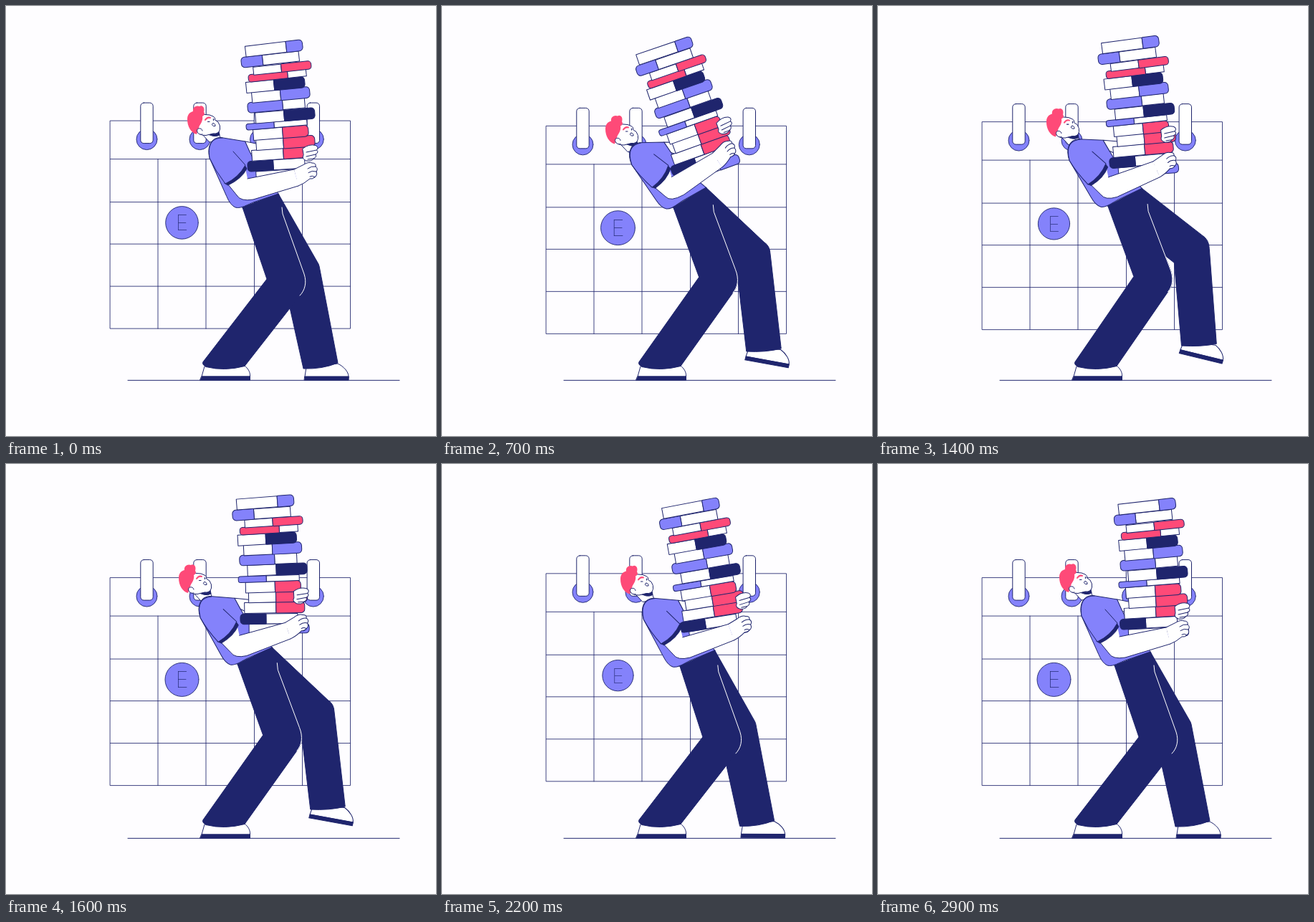
An HTML page with a canvas for the animation above (3 s loop, 600 px wide and 600 px high).

```html
<!DOCTYPE html>
<html lang="en">
<head>
<meta charset="utf-8">
<title>Carrying books</title>
<style>
  html, body { margin: 0; width: 100%; height: 100%; overflow: hidden; background: #fefdff; }
  canvas { display: block; width: 600px; height: 600px; }
</style>
</head>
<body>
<canvas id="stage" width="600" height="600"></canvas>
<script>
const ctx = document.getElementById('stage').getContext('2d');
const LOOP = 3000, STEP = 100;
const PAPER = '#fefdff', WHITE = '#fff', NAVY = '#1f256d', VIOLET = '#8482fb', PINK = '#fe4a78';

// Pose keys; values are offsets from the starting pose.
const TIMES = [0, 400, 700, 1100, 1600, 2200, 2900];
const POSE = {
  torsoX: [0, -3, -7, -11, -7, 2, 0],
  torsoY: [0, 2, 2, 0, -1, 2, 0],
  torsoA: [0, -7, -10.6, -9.5, -5, -4, 0],
  headX: [0, -14, -25, -25.5, -12, -4, 0],
  headY: [0, 7.5, 13.5, 10, 1, 2.5, 0],
  stackX: [0, -10, -17, -19, -10, -5, 0.6],
  stackY: [0, 6, 7, 1, -5, 6, 0],
  lean: [0, -12.3, -15.8, -8.5, -0.8, -7.5, 0.3],
  tilt: [0, -9.5, -13.5, -9.5, 2.5, -4.5, 0.3],
  handX: [0, -14, -23, -23, -12, -2, 0],
  handY: [0, -20, -29, -25, -8, -6, 0],
  gripX: [0, -21, -30, -28, -13, -4, 0],
  gripY: [0, -27, -38, -34, -21, -14, 0]
};

// cx, cy, length, height, cap length (negative: cap on the left), cap colour
const BOOKS = [
  [374, 59, 80, 15, 23, VIOLET],
  [368.5, 74.5, 81, 14, -30, VIOLET],
  [385.5, 86.5, 81, 11, 42, PINK],
  [378.5, 97, 81, 10, -55, PINK],
  [376, 110, 82, 15, 43, NAVY],
  [383.5, 124, 81, 15, 41, VIOLET],
  [377, 138.5, 80, 14, -49, VIOLET],
  [389.5, 153, 83, 15, 43, NAVY],
  [377.5, 165.5, 85, 8, -39, VIOLET],
  [383.5, 177, 77, 15, 36, PINK],
  [390, 191, 82, 15, 44, PINK],
  [385, 206, 84, 15, 40, PINK],
  [377, 221.5, 80, 14, -36, NAVY],
  [391, 235, 84, 13, 30, VIOLET]
];

const rad = deg => deg * Math.PI / 180;

// Smooth cyclic interpolation without overshoot.
function sample(vals, t) {
  const n = TIMES.length;
  const at = k => vals[(k + n) % n];
  const when = k => TIMES[(k + n) % n] + Math.floor(k / n) * LOOP;
  const slope = k => (at(k + 1) - at(k)) / (when(k + 1) - when(k));
  const tangent = k => {
    const a = slope(k - 1), b = slope(k);
    return a * b > 0 ? 2 * a * b / (a + b) : 0;
  };
  let i = n - 1;
  while (TIMES[i] > t) i--;
  const h = when(i + 1) - when(i), u = (t - when(i)) / h, v = 1 - u;
  return at(i) * (1 + 2 * u) * v * v + at(i + 1) * u * u * (3 - 2 * u)
    + h * u * v * (tangent(i) * v - tangent(i + 1) * u);
}

// Rigid move: turn about (px, py), then shift.
function rigid(px, py, dx, dy, deg) {
  const c = Math.cos(rad(deg)), s = Math.sin(rad(deg));
  const move = (x, y) => [
    px + dx + (x - px) * c - (y - py) * s,
    py + dy + (x - px) * s + (y - py) * c
  ];
  move.draw = fn => {
    ctx.save();
    ctx.translate(px + dx, py + dy);
    ctx.rotate(rad(deg));
    ctx.translate(-px, -py);
    fn();
    ctx.restore();
  };
  return move;
}

function shape(d, fill, stroke = NAVY, width = 1) {
  const path = new Path2D(d);
  if (fill) { ctx.fillStyle = fill; ctx.fill(path); }
  if (stroke) { ctx.strokeStyle = stroke; ctx.lineWidth = width; ctx.stroke(path); }
}

function disc(x, y, r, fill) {
  ctx.beginPath();
  ctx.arc(x, y, r, 0, 2 * Math.PI);
  ctx.fillStyle = fill;
  ctx.fill();
  ctx.strokeStyle = NAVY;
  ctx.lineWidth = 0.9;
  ctx.stroke();
}

function box(x, y, w, h, radii, fill) {
  ctx.beginPath();
  ctx.roundRect(x, y, w, h, radii);
  ctx.fillStyle = fill;
  ctx.fill();
  ctx.strokeStyle = NAVY;
  ctx.lineWidth = 1;
  ctx.stroke();
}

function calendar(t) {
  ctx.save();
  ctx.translate(0, 160.1 + 7.3 * Math.sin(2 * Math.PI * t / LOOP));
  let grid = 'M145.5 0H480.5V290H145.5Z';
  for (const y of [53.5, 113.5, 172, 231]) grid += `M145.5 ${y}H480.5`;
  for (const x of [212, 279, 346.5, 413.5]) grid += `M${x} 53.5V290`;
  shape(grid, null, NAVY, 0.85);
  for (const x of [196.5, 270.5, 355, 428.8]) {
    disc(x, 26, 14.5, VIOLET);
    box(x - 8.7, -25, 17.4, 56.5, 4.5, WHITE);
  }
  const r = 22.8 - 1.2 * Math.sin(2 * Math.PI * t / 1000);
  ctx.translate(245.5, 142.3);
  disc(0, 0, r, VIOLET);
  ctx.scale(r / 22.8, r / 22.8);
  ctx.fillStyle = NAVY;
  ctx.font = '100 30px Inter, Lato, sans-serif';
  ctx.textAlign = 'center';
  ctx.fillText('E', 0, 11);
  ctx.restore();
}

function legs(p, torso) {
  const q = p * p;
  const back = torso(330, 281), front = torso(380, 262);

  // Lifted foot and leg
  ctx.save();
  ctx.translate(417 + 26 * p - 23 * q, 517 - 42 * p);
  ctx.rotate(rad(15.5 * p));
  shape('M0 0L2-13L46-18C54-14 61-7 61 0Z', WHITE);
  shape('M0 0H61.3L61 5H-.5Z', NAVY);
  ctx.restore();
  const hemX = 463 + 30 * p - 22 * q, hemY = 498 - 30 * p;
  const inX = 415 + 30 * p - 23 * q, inY = 506 - 36 * p;
  const kneeX = 436 + 27 * p - 11 * q, kneeY = 360 - 46 * p;
  const calfX = 438 + 38 * p - 12 * q, calfY = 368 - 33 * p;
  shape(`M${back}L${front}L${kneeX} ${kneeY}
    Q${calfX - 1 + p} ${calfY - 6 - 8 * p} ${calfX} ${calfY}
    L${hemX} ${hemY}Q${(hemX + inX) / 2 + 2} ${(hemY + inY) / 2 + 5 - 2 * p} ${inX} ${inY}
    L${390 + 52 * p - 29 * q} ${394 - 10 * p - 34 * q}L385 336Z`, NAVY);

  // Standing foot and leg
  shape('M277 503L273 517H340.5C341 511 338 506 333 502Z', WHITE);
  shape('M273 517H340.5V522H271Z', NAVY);
  const edge = `L${386 - 10 * p} ${290 - 4 * p}L${416 - 10 * p} ${374 - 10 * p}
    C${420 - 8 * p} ${386 - 8 * p} ${417 - 6 * p} ${397 - 7 * p} ${410 - 6 * p} ${404 - 6 * p}`;
  const start = `M${385 - 10 * p} ${281 - 5 * p}`;
  shape(`${start}${edge}L333 502.5Q305 510 279 503.5Q273 500 275 496.5
    L${364 - 8 * p} ${381 - 4 * p}L${back}L${front}Z`, NAVY);
  shape(start + edge, null, WHITE, 1);
}

function head() {
  shape('M271 176L284 190L300 187L296 174Z', WHITE);
  shape('M282 179L297 175L298 180Q294 182.5 289 181.5Z', NAVY);
  shape(`M272 151L284 152L289 154Q293 156 291.5 159L296 162Q299.5 167 298.5 172
    Q297 179 289 178L279 180.5Q270 181 265 174Z`, WHITE);
  shape(`M266 179C258 177 253 168 253 158C253 151 257 148 261 147C260 141 266 138 270 140
    C274 137.5 278 142 276 148C278 150 276.5 153 274 154C275 158 273 163 270 167Z`, PINK, null);
  shape('M274 179C268 181 264 173 268.5 171Q273 170 274 174', WHITE);
  shape('M278 159Q281 154.5 285 156', null, PINK, 2);
  shape('M281.5 161.5H284M289.5 157.5V159.5', null, NAVY, 1.2);
  shape('M289 163.5Q292.5 164 292 167.5Q289 168.5 287.5 166Z', WHITE);
}

function shirt() {
  shape(`M284 212C280 195 287 183 300 183.5L334 189L341 205L350 225L380 262L345 274
    L338 277Q326 283 320 281Q313 278 308 266Z`, VIOLET);
  shape('M334 189L354 193L356 214L341 205Z', WHITE);
}

function sleeve() {
  shape('M305 247Q324 240 333 222L336 227Q329 241 310 250Z', NAVY);
  shape('M284 212C281 191 289 184 302 186C314 189 325 207 334 222Q325 239 306 248Q292 230 284 212Z', VIOLET, null);
  shape('M317 203L334 222Q325 239 306 248Q292 230 284 212C281 191 289 184 302 184', null);
}

function book([, , len, h, cap, color], deg) {
  const w = Math.abs(cap), left = cap < 0;
  ctx.rotate(rad(deg));
  box(-len / 2 + (left ? w : 0), -h / 2, len - w, h, 0, WHITE);
  const r = Math.min(5, h * 0.4);
  box(left ? -len / 2 : len / 2 - w, -h / 2 - 0.3, w, h + 0.6,
    left ? [r, 1, 1, r] : [1, r, r, 1], color);
}

// Lower books tilt a little more than upper ones.
function stack(v) {
  const base = rigid(337, 223, v.stackX, v.stackY, v.lean);
  for (let i = BOOKS.length - 1; i >= 0; i--) {
    ctx.save();
    ctx.translate(...base(BOOKS[i][0], BOOKS[i][1]));
    book(BOOKS[i], -6.7 + i * 0.25 + v.tilt * (0.9 + i * 0.025));
    ctx.restore();
  }
}

function farHand() {
  shape(`M414 199Q423 192 432 194.5Q437 197 433.5 201Q437 204 432 207
    Q434 211 429 213Q427 217 419 216Q412 213 415 208Z`, WHITE);
  shape('M433.5 201L419 204M432 207L419 210M429 213L421 214', null);
}

function arm(v, torso) {
  const elbow = torso(328, 268);
  const turn = Math.atan2(235 + v.handY - elbow[1], 420 + v.handX - elbow[0])
    - Math.atan2(235 - 268, 420 - 328);
  const fore = rigid(420, 235, v.handX, v.handY, turn * 180 / Math.PI);
  const outer = `M${torso(309, 248)}L${torso(322, 264)}Q${torso(327, 273)} ${fore(345, 270)}L${fore(408, 251)}`;
  const crease = `${fore(337, 241)}L${fore(402, 228)}`;
  shape(`${outer}L${fore(402, 228)}L${fore(337, 241)}L${torso(334, 226)}Z`, WHITE, null);
  shape(`${outer}M${crease}`, null);
  fore.draw(() => {
    shape(`M402 228L415 221.5Q422 217 427 219Q433 219 432 224Q436 227 433 231
      Q435 236 431 238.5Q428 242 424 241Q416 248 408 251`, WHITE);
    shape('M432 224Q426 223 421 227M433 231Q427 229 422 232.5M431 238.5Q427 236 424 238', null);
  });
}

function render(t) {
  const v = {};
  for (const k in POSE) v[k] = sample(POSE[k], t);
  const lift = t < 2300 ? (1 - Math.cos(Math.PI * t / 1150)) / 2 : 0;
  const torso = rigid(320, 281, v.torsoX, v.torsoY, v.torsoA);

  ctx.fillStyle = PAPER;
  ctx.fillRect(0, 0, 600, 600);
  calendar(t);
  shape('M170 522.3H549', null, NAVY, 1);
  legs(lift, torso);
  rigid(0, 0, v.headX, v.headY, 0).draw(head);
  torso.draw(shirt);
  stack(v);
  rigid(424, 205, v.gripX, v.gripY, v.tilt).draw(farHand);
  arm(v, torso);
  torso.draw(sleeve);
}

ctx.lineJoin = ctx.lineCap = 'round';
const begin = performance.now();
function tick() {
  const t = (performance.now() - begin) % LOOP;
  render(Math.floor(t / STEP) * STEP);
  requestAnimationFrame(tick);
}
tick();
</script>
</body>
</html>
```
